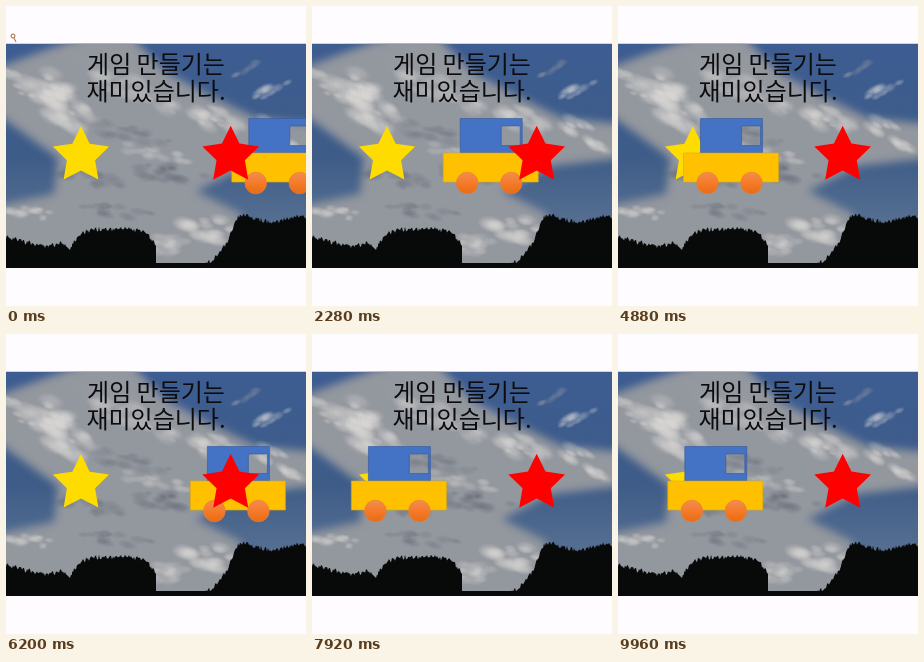
Animation of 300x300 px, one loop 10 s. Source, as an HTML page with a canvas:

```html
<!DOCTYPE html>
<html lang="ko">
<head>
<meta charset="utf-8">
<title>게임 만들기</title>
<style>
html, body { margin: 0; width: 100%; height: 100%; overflow: hidden; background: #fefcfe; }
canvas { display: block; width: 300px; height: 300px; }
</style>
</head>
<body>
<canvas id="stage" width="300" height="300"></canvas>
<script>
const ctx = document.getElementById('stage').getContext('2d');
const SIZE = 300, TOP = 37.5, BOTTOM = 262;
const LOOP = 10000, STEP = 40, SPEED = 0.0901;
const START = 273.3, RESTART = 8880;

let seed = 11;
function random() {
  seed = (seed * 16807) % 2147483647;
  return seed / 2147483647;
}

function polygon(g, points) {
  g.beginPath();
  points.forEach(([x, y]) => g.lineTo(x, y));
  g.closePath();
  g.fill();
}

// Soft cloud built from flat puffs scattered inside a tilted ellipse.
function cloud(g, x, y, rx, ry, tilt, rgb, alpha) {
  g.save();
  g.translate(x, y);
  g.rotate(tilt);
  const count = 6 + Math.round(rx * ry / 25);
  for (let i = 0; i < count; i++) {
    const angle = random() * Math.PI * 2, reach = Math.sqrt(random());
    const r = 3 + random() * Math.min(rx, ry) * 0.6;
    g.save();
    g.translate(Math.cos(angle) * rx * reach, Math.sin(angle) * ry * reach);
    g.scale(1.5, 0.8);
    const shade = g.createRadialGradient(0, 0, 0, 0, 0, r);
    shade.addColorStop(0, `rgba(${rgb},${alpha})`);
    shade.addColorStop(0.5, `rgba(${rgb},${alpha * 0.7})`);
    shade.addColorStop(1, `rgba(${rgb},0)`);
    g.fillStyle = shade;
    g.fillRect(-r, -r, r * 2, r * 2);
    g.restore();
  }
  g.restore();
}

function treeLine(g, from, to, height) {
  g.beginPath();
  g.moveTo(from, BOTTOM);
  for (let x = from; x <= to; x++) g.lineTo(x, height(x) + random() * 5 - 2.5);
  g.lineTo(to, BOTTOM);
  g.fill();
}

function makeScene() {
  const canvas = document.createElement('canvas');
  canvas.width = canvas.height = SIZE;
  const g = canvas.getContext('2d');
  g.fillStyle = '#fefcfe';
  g.fillRect(0, 0, SIZE, SIZE);
  g.save();
  g.beginPath();
  g.rect(0, TOP, SIZE, BOTTOM - TOP);
  g.clip();

  const sky = g.createLinearGradient(0, TOP, 0, BOTTOM);
  sky.addColorStop(0, '#3d5c92');
  sky.addColorStop(0.5, '#3e5c88');
  sky.addColorStop(0.8, '#566f91');
  sky.addColorStop(1, '#8896a6');
  g.fillStyle = sky;
  g.fillRect(0, TOP, SIZE, BOTTOM - TOP);

  g.filter = 'blur(4px)';
  g.fillStyle = '#93979e';
  polygon(g, [
    [-9, 62], [45, 42], [80, 30], [125, 30], [160, 66], [205, 90], [250, 112],
    [310, 118], [310, 152], [240, 160], [190, 185], [235, 208], [235, 270],
    [-9, 270], [-9, 200], [48, 188], [52, 152], [-9, 108]
  ]);
  g.filter = 'none';

  const white = '226,223,219', grey = '150,154,161', dark = '84,92,106';
  const clouds = [
    [30, 78, 36, 16, 0.3, white, 0.3], [62, 105, 32, 16, 0.5, white, 0.3],
    [100, 62, 32, 18, 0.5, grey, 0.3], [130, 85, 50, 12, 0.4, white, 0.2],
    [205, 112, 38, 10, 0.4, white, 0.3], [272, 128, 28, 9, 0.5, white, 0.35],
    [266, 84, 18, 5, -0.4, white, 0.35], [240, 62, 20, 3, -0.5, grey, 0.3],
    [125, 128, 40, 9, 0.2, dark, 0.18], [85, 172, 32, 9, 0.2, dark, 0.2],
    [165, 168, 35, 9, 0.1, dark, 0.25], [150, 148, 40, 6, 0.2, white, 0.25],
    [22, 208, 30, 7, 0.1, white, 0.3], [105, 205, 45, 6, 0.1, dark, 0.2],
    [205, 222, 26, 12, 0.2, white, 0.35], [155, 238, 30, 10, 0, white, 0.25]
  ];
  clouds.forEach(args => cloud(g, ...args));

  g.fillStyle = '#080909';
  g.fillRect(0, 257, SIZE, 6);
  treeLine(g, 0, 42, x => 231 + x * 0.25);
  treeLine(g, 38, 72, x => 237 + Math.abs(x - 53) * 0.4);
  treeLine(g, 66, 150, x => 223 + (x - 108) ** 4 / 200000);
  treeLine(g, 190, 230, x => 260 - (x - 190) ** 2 / 40);
  treeLine(g, 222, 300, x => 213 - Math.sin((x - 224) / 9) * 3 + Math.max(0, 232 - x) * 2);
  g.restore();
  return canvas;
}

function star(x, y, radius, color) {
  ctx.beginPath();
  for (let i = 0; i < 10; i++) {
    const r = i % 2 ? radius * 0.5 : radius;
    const angle = i * Math.PI / 5 - Math.PI / 2;
    ctx.lineTo(x + r * Math.cos(angle), y + r * Math.sin(angle));
  }
  ctx.closePath();
  ctx.fillStyle = color;
  ctx.fill();
}

function paint(color, edge) {
  ctx.fillStyle = color;
  ctx.fill('evenodd');
  ctx.strokeStyle = edge;
  ctx.lineWidth = 0.6;
  ctx.stroke();
}

function truck(left) {
  ctx.save();
  ctx.translate(left, 0);
  ctx.beginPath();
  ctx.rect(17, 112.5, 62, 34.5);
  ctx.rect(58, 120, 19, 19.5);
  paint('#4472c4', '#35599c');
  ctx.beginPath();
  ctx.rect(0, 147, 95, 29);
  paint('#ffc000', '#e0aa08');
  const tyre = ctx.createLinearGradient(0, 166, 0, 188);
  tyre.addColorStop(0, '#f18c55');
  tyre.addColorStop(0.5, '#f67b28');
  tyre.addColorStop(1, '#e56b17');
  for (const x of [24, 68]) {
    ctx.beginPath();
    ctx.arc(x, 177, 10.8, 0, Math.PI * 2);
    paint(tyre, '#ed7d31');
  }
  ctx.restore();
}

function title() {
  ctx.fillStyle = '#0c0c0e';
  ctx.font = '300 24px "Noto Sans CJK KR", "Noto Sans CJK", sans-serif';
  ctx.textAlign = 'center';
  ctx.fillText('게임 만들기는', 150, 67);
  ctx.fillText('재미있습니다.', 150, 94);
}

function pointer() {
  ctx.strokeStyle = '#a5603c';
  ctx.lineWidth = 1;
  ctx.beginPath();
  ctx.arc(7, 30, 2, 0, Math.PI * 2);
  ctx.moveTo(8, 32);
  ctx.lineTo(10, 36);
  ctx.stroke();
}

// The truck's centre wraps at the stage edge, with one early restart.
function truckCentre(t) {
  return t < RESTART ? (START + t * SPEED) % SIZE : (t - RESTART) * SPEED;
}

const scene = makeScene();
const begin = performance.now();

function draw() {
  const elapsed = (performance.now() - begin) % LOOP;
  const t = Math.floor(elapsed / STEP) * STEP;
  ctx.drawImage(scene, 0, 0);
  title();
  star(75, 149.6, 29.6, '#ffdc00');
  truck(truckCentre(t) - 47.5);
  star(224.7, 149.6, 29.8, '#ff0000');
  if (t < STEP) pointer();
  requestAnimationFrame(draw);
}
draw();
</script>
</body>
</html>
```
